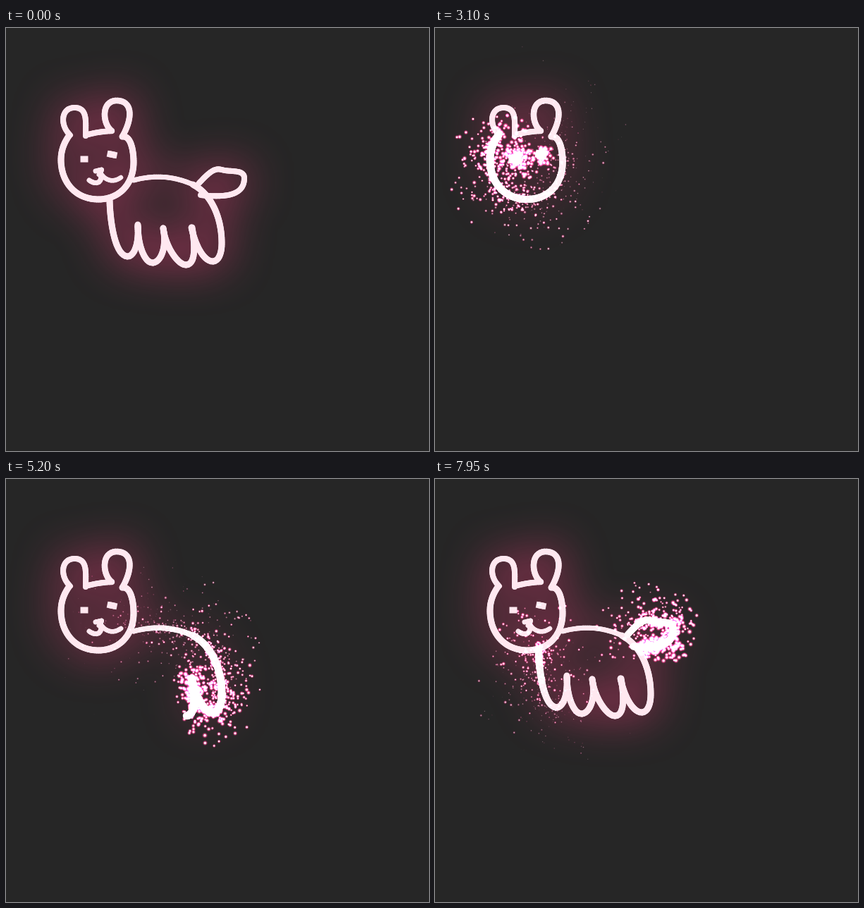
Write an HTML page with a canvas that moves like this. It is 600 px wide and 600 px high and loops after 8 s.

```html
<!DOCTYPE html>
<html lang="en">
<head>
<meta charset="utf-8">
<title>Neon doodle</title>
<style>
  html, body { margin: 0; width: 100%; height: 100%; overflow: hidden; background: #262626; }
  canvas { display: block; width: 100vw; height: 100vh; }
</style>
</head>
<body>
<canvas id="stage" width="600" height="600"></canvas>
<script>
const SIZE = 600, LOOP = 8000, STEP = 50, RATE = 0.85;
const ctx = document.getElementById('stage').getContext('2d');

const clamp = v => Math.max(0, Math.min(1, v));
const mix = (a, b, k) => a + (b - a) * k;

let seed = 20417;
function rnd() {
  seed = (seed + 0x6D2B79F5) | 0;
  let x = Math.imul(seed ^ (seed >>> 15), 1 | seed);
  x = (x + Math.imul(x ^ (x >>> 7), 61 | x)) ^ x;
  return ((x ^ (x >>> 14)) >>> 0) / 4294967296;
}

function layer(size) {
  const c = document.createElement('canvas');
  c.width = c.height = size;
  return c;
}

// A pen stroke: drawn at constant speed until the next one starts
const strokes = [];
function stroke(start, width, d, cap = 'round') {
  const path = document.createElementNS('http://www.w3.org/2000/svg', 'path');
  path.setAttribute('d', d);
  strokes.push({ start, width, cap, path, total: path.getTotalLength() });
}

// ears and head
stroke(380, 8, 'M91,152 C76,138 78,113 97,113 S113,132 113,153');
stroke(910, 8, 'M113,152 Q130,147 150,146');
stroke(1100, 8.5, 'M150,146 C137,137 134,103 157,103 S180,128 165,154');
stroke(1700, 9, 'M165,154 C178,152 181,177 181,190 C181,222 160,243 131,243 C98,243 78,218 78,187 Q78,168 90,152');
// face
stroke(2650, 9, 'M110,186 h2', 'square');
stroke(2900, 9, 'M148,179 l5,1', 'square');
stroke(3120, 7, 'M127,203 L136,201 L132,208');
stroke(3320, 7, 'M134,205 C138,222 126,222 118,216');
stroke(3550, 6.5, 'M135,207 C141,216 152,220 163,212');
// back and legs
stroke(3800, 7, 'M181,216 Q225,204 265,222');
stroke(4200, 9, 'M265,222 C292,236 306,270 306,305 C306,345 276,340 263,283');
stroke(4980, 9, 'M264,283 C270,320 266,336 255,336 S226,310 223,284');
stroke(5450, 9, 'M223,284 C229,316 217,334 207,333 S187,310 187,279');
stroke(6250, 9, 'M187,280 C189,312 179,325 172,324 C152,322 147,262 147,243');
// tail
stroke(7120, 8, 'M273,221 C292,200 298,199 306,201 C320,205 338,200 338,213 C338,240 306,240 276,237');

strokes.forEach((s, i) => {
  s.end = i + 1 < strokes.length ? strokes[i + 1].start : LOOP - 20;
  const n = Math.ceil(s.total / 3);
  s.pts = Array.from({ length: n + 1 }, (_, j) => {
    const { x, y } = s.path.getPointAtLength(s.total * j / n);
    return { x, y, t: mix(s.start, s.end, j / n) };
  });
});

const sparks = [];
for (const s of strokes) {
  const count = Math.round((s.end - s.start) * RATE), last = s.pts.length - 1;
  for (let i = 0; i < count; i++) {
    const u = (i + rnd()) / count, j = Math.min(last - 1, Math.floor(u * last));
    const a = s.pts[j], b = s.pts[j + 1], k = u * last - j;
    const heading = Math.atan2(b.y - a.y, b.x - a.x);
    const angle = rnd() * Math.PI * 2, speed = 6 + 105 * rnd() ** 2;
    sparks.push({
      born: mix(s.start, s.end, u),
      x: mix(a.x, b.x, k),
      y: mix(a.y, b.y, k),
      vx: Math.cos(angle) * speed + Math.cos(heading) * 18,
      vy: Math.sin(angle) * speed + Math.sin(heading) * 18,
      life: 1000 + 800 * rnd(),
      size: 2.8 + 2.4 * rnd()
    });
  }
}

const dot = layer(32);
{
  const g = dot.getContext('2d'), r = g.createRadialGradient(16, 16, 0, 16, 16, 16);
  r.addColorStop(0, '#fff');
  r.addColorStop(0.28, '#fff');
  r.addColorStop(0.46, 'rgba(255,80,160,.8)');
  r.addColorStop(0.72, 'rgba(235,40,120,.35)');
  r.addColorStop(1, 'rgba(235,40,120,0)');
  g.fillStyle = r;
  g.fillRect(0, 0, 32, 32);
}

// Draws every finished piece of line; style() sets the look from its age
function drawPieces(g, now, style) {
  for (const s of strokes) {
    for (let i = 1; i < s.pts.length; i++) {
      const a = s.pts[i - 1], b = s.pts[i];
      if (a.t >= now) break;
      const k = clamp((now - a.t) / (b.t - a.t));
      style(s, now - a.t);
      g.beginPath();
      g.moveTo(a.x, a.y);
      g.lineTo(mix(a.x, b.x, k), mix(a.y, b.y, k));
      g.stroke();
    }
  }
}

const halo = layer(SIZE), hctx = halo.getContext('2d');

function drawGlow(now) {
  hctx.clearRect(0, 0, SIZE, SIZE);
  hctx.strokeStyle = '#ff4081';
  drawPieces(hctx, now, (s, age) => {
    hctx.globalAlpha = mix(0.4, 1, clamp(age / 2600));
    hctx.lineWidth = s.width * 1.25;
  });
  ctx.filter = 'blur(31px)';
  ctx.drawImage(halo, 0, 0);
  ctx.filter = 'none';
}

function drawLines(now) {
  drawPieces(ctx, now, (s, age) => {
    const cool = clamp((age - 500) / 1000);
    ctx.strokeStyle = `rgb(255,${Math.round(mix(255, 232, cool))},${Math.round(mix(255, 240, cool))})`;
    ctx.lineWidth = s.width + 2 * (1 - cool);
    ctx.lineCap = s.cap;
  });
}

function drawSparks(now) {
  ctx.globalCompositeOperation = 'lighter';
  for (const p of sparks) {
    const age = now - p.born;
    if (age < 0 || age > p.life) continue;
    const k = age / p.life, run = 1.4 * (1 - Math.exp(-age / 1400));
    const r = mix(p.size, 0.9, k ** 1.2);
    ctx.globalAlpha = clamp((1 - k) * 2);
    ctx.drawImage(dot, p.x + p.vx * run - r, p.y + p.vy * run - r, r * 2, r * 2);
  }
  ctx.globalAlpha = 1;
  ctx.globalCompositeOperation = 'source-over';
}

function render(ms) {
  const t = Math.floor((ms % LOOP) / STEP) * STEP;
  const now = t < STEP ? LOOP * 2 : t;   // the loop opens on the finished, cooled doodle
  ctx.fillStyle = '#262626';
  ctx.fillRect(0, 0, SIZE, SIZE);
  if (now < 400) return;
  drawGlow(now);
  drawLines(now);
  drawSparks(now);
}

let begin = null, last = -1;
function tick(ms) {
  if (begin === null) begin = ms;
  const step = Math.floor((ms - begin) / STEP);
  if (step !== last) {
    last = step;
    render(ms - begin);
  }
  requestAnimationFrame(tick);
}
render(0);
requestAnimationFrame(tick);
</script>
</body>
</html>
```
